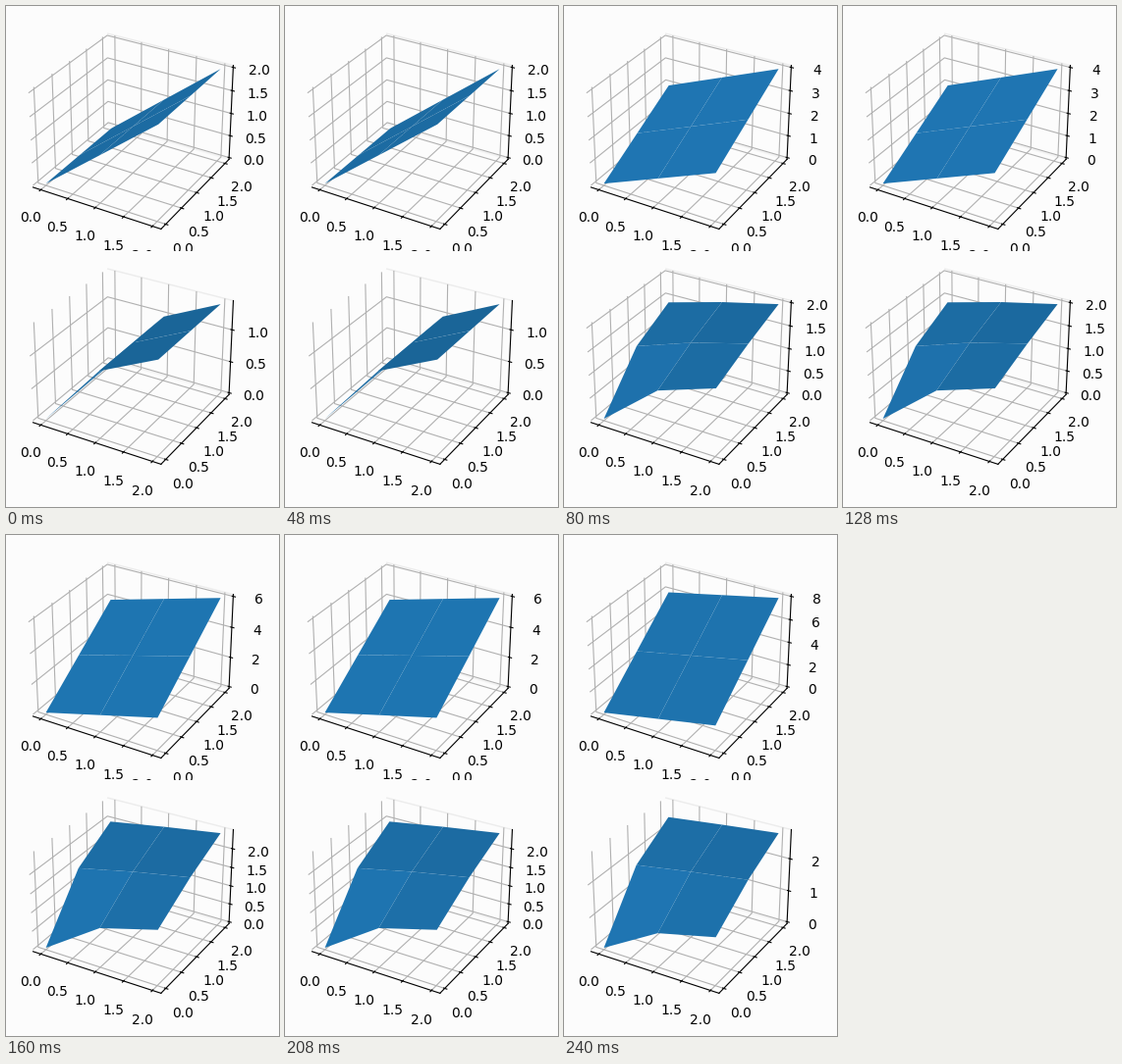
Recreate the animation shown at these times as a matplotlib script. Size 278x511 px, loop 320 ms.

```python
import matplotlib.pyplot as plt
import numpy as np
from matplotlib.animation import FuncAnimation
from matplotlib.ticker import MaxNLocator

W, H, DPI = 278, 511, 100
SIDE, LEFT = 232, 10
TOPS = (10.1, 250)
BG = "#fcfcfc"
EDGES = (BG, "#ececec", "#f4f4f4")

x, y = np.meshgrid(np.arange(3.0), np.arange(3.0))
locator = MaxNLocator(5, steps=[1, 2, 5, 10])
fig = plt.figure(figsize=(W / DPI, H / DPI), dpi=DPI, facecolor=BG)


def padded(hi, margin):
    """Limits around 0..hi with a data margin and a small frame gap."""
    pad = hi * ((1 + 2 * margin) * 25 / 24 - 1) / 2
    return -pad, hi + pad


def make_axes(top):
    box = [LEFT / W, 1 - (top + SIDE) / H, SIDE / W, SIDE / H]
    ax = fig.add_axes(box, projection="3d", facecolor=BG)
    for axis, edge in zip((ax.xaxis, ax.yaxis, ax.zaxis), EDGES):
        axis.pane.set(facecolor=BG, edgecolor=edge, alpha=1)
    return ax


axes = [make_axes(top) for top in TOPS]
surfaces = []


def draw(k):
    while surfaces:
        surfaces.pop().remove()
    plane = x + k * y
    for ax, z in zip(axes, (plane, np.sqrt(plane))):
        surfaces.append(ax.plot_surface(x, y, z, color="#1f77b4"))
        top = z.max()
        ticks = locator.tick_values(0, top)
        ax.set_zticks(ticks[ticks <= top])
        ax.set_xlim(*padded(2, 0.05))
        ax.set_ylim(*padded(2, 0.05))
        ax.set_zlim(*padded(top, 0))
    return surfaces


anim = FuncAnimation(fig, draw, frames=4, interval=80, init_func=lambda: surfaces,
                     repeat=True, repeat_delay=0, blit=False)
plt.show()
```
